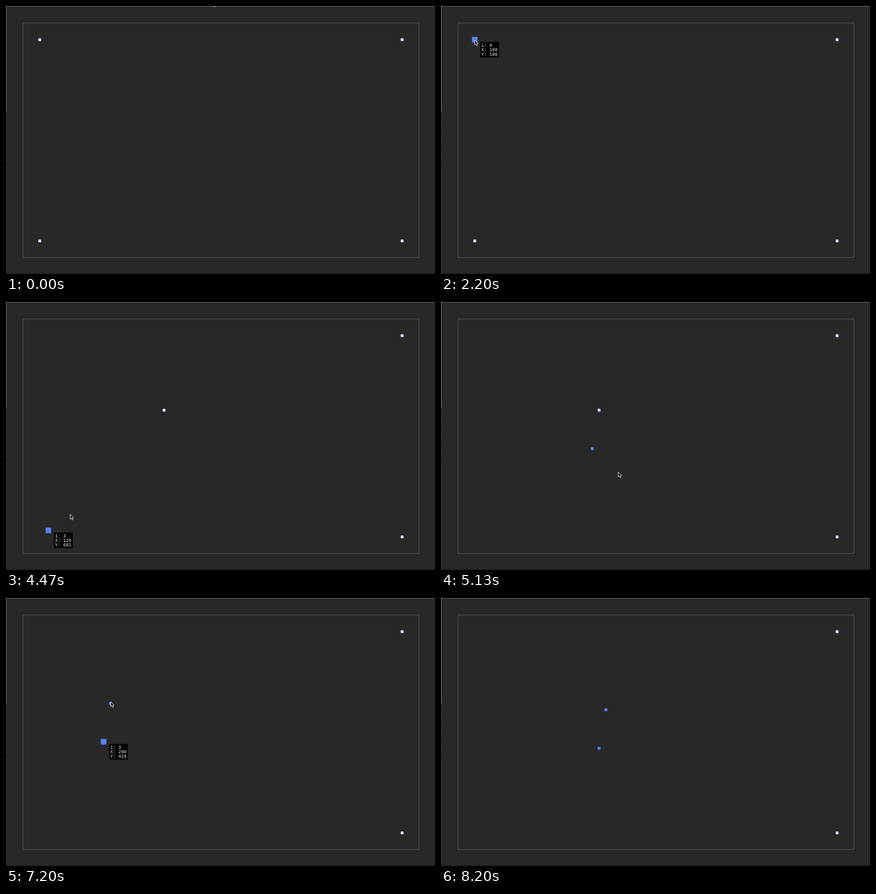
Recreate the animation shown at these times as an HTML page. Size 947 by 592 pixels, loop 9340 ms.

```html
<!DOCTYPE html>
<html lang="en">
<head>
<meta charset="utf-8">
<title>Draggable points</title>
<style>
  html, body { margin: 0; width: 100%; height: 100%; overflow: hidden; background: #282828; }
  svg { display: block; width: 100%; height: 100%; }
  text { font: 10px "Liberation Mono", "DejaVu Sans Mono", monospace; fill: #eee; white-space: pre; }
</style>
</head>
<body>
<svg viewBox="0 0 947 592">
  <rect width="947" height="592" fill="#282828"/>
  <g id="edges">
    <rect width="947" height="1" fill="#808080"/>
    <rect y="590" width="947" height="2" fill="#241e21"/>
    <rect width="1" height="235" fill="#8c8c8c"/>
    <rect y="235" width="1" height="357" fill="#292b3c"/>
  </g>
  <rect x="37.5" y="37.5" width="874" height="518" fill="none" stroke="#5e5e5e"/>
  <g id="points" stroke="#5881ee" stroke-opacity=".6" stroke-width=".74"></g>
  <rect id="marquee" fill="none" stroke="#5e5e5e"/>
  <g id="tip">
    <rect width="41.5" height="34.5" fill="#000"/>
    <text x="2.5" y="10.5"></text>
    <text x="2.5" y="20.5"></text>
    <text x="2.5" y="30.5"></text>
  </g>
  <path id="cursor" d="M0 .5V11.4L2.5 9.2L4.4 13.3L6.3 12.4L4.5 8.4H7.7Z" fill="#202020" stroke="#eee"/>
</svg>
<script>
const LOOP = 9340, STEP = 1000 / 15;
const SCALE = 0.7407, SHIFT = 0.4;
const WHITE = '#fff', BLUE = '#5881ee';
const $ = id => document.getElementById(id);

const toScreen = units => units * SCALE + SHIFT;
const toUnits = px => Math.round((px - SHIFT) / SCALE);
const between = (s, from, to) => s >= from && s < to;
const smooth = u => u * u * (3 - 2 * u);
const mix = (a, b, u) => a.map((v, i) => v + (b[i] - v) * u);

const corners = [[100, 100], [1180, 100], [1180, 700], [100, 700]].map(p => p.map(toScreen));
const upperDrop = [349, 239], lowerDrop = [334, 324];
const boxStart = [427, 404], boxEnd = [282, 175];

// Fast sweep of the grabbed pair, u from 0 to 1.
function orbit(u) {
  const a = (158 + 281 * u) * Math.PI / 180;
  return [361 + 157 * Math.cos(a), 282 + 95 * Math.sin(a)];
}

// Cursor moves: first step, last step, destination
const moves = [
  [4, 8, [82, 86]],
  [18, 22, corners[0]],
  [34, 40, upperDrop],
  [43, 51, [91, 501]],
  [51, 53, corners[3]],
  [65, 71, lowerDrop],
  [74, 77, [391, 375]],
  [79, 82, boxStart],
  [82, 88, boxEnd],
  [88, 100, [338, 322]],
  [102, 107, orbit(0)],
  [107, 112, orbit],
  [112, 113, [320, 364]],
  [113, 121, [349, 332]]
];

function cursorAt(s) {
  let at = [455, -11];
  for (const [start, end, goal] of moves) {
    if (s <= start) break;
    const u = Math.min(1, (s - start) / (end - start));
    at = typeof goal === 'function' ? goal(u) : mix(at, goal, smooth(u));
  }
  return at;
}

// A dragged point trails the cursor by one step.
function dragged(s, start, end, home) {
  return s <= start ? home : cursorAt(Math.min(s, end) - 1);
}

function layout(s) {
  const points = corners.slice();
  points[0] = dragged(s, 34, 41, corners[0]);
  points[3] = dragged(s, 65, 72, corners[3]);
  if (s > 102) {
    points[3] = cursorAt(s - 1);
    points[0] = points[3].map((v, i) => v + upperDrop[i] - lowerDrop[i]);
  }
  return points;
}

function set(el, attrs) {
  for (const name in attrs) el.setAttribute(name, attrs[name]);
}

function addRect(parent, attrs = {}) {
  const el = document.createElementNS('http://www.w3.org/2000/svg', 'rect');
  set(el, attrs);
  parent.append(el);
  return el;
}

const squares = corners.map(() => addRect($('points')));
const lines = $('tip').querySelectorAll('text');

for (let y = 240; y < 380; y += 20) {
  addRect($('edges'), { y, width: 1, height: 3, fill: '#77777c' });
}

function render(s) {
  const points = layout(s);
  const hovered = between(s, 21, 44) ? 0
    : between(s, 53, 75) || between(s, 102, 123) ? 3 : -1;
  const selected = [between(s, 28, 59) || s >= 88, false, false, s >= 59];

  points.forEach(([x, y], i) => {
    const size = (i === hovered ? 16 : 8) * SCALE;
    set(squares[i], {
      x: x - size / 2, y: y - size / 2, width: size, height: size,
      fill: selected[i] ? BLUE : WHITE
    });
  });

  $('tip').style.display = hovered < 0 ? 'none' : '';
  if (hovered >= 0) {
    const [x, y] = points[hovered];
    set($('tip'), { transform: `translate(${x + 12} ${y + 4.8})` });
    lines[0].textContent = `i: ${hovered}`;
    lines[1].textContent = `X: ${toUnits(x)}`;
    lines[2].textContent = `Y: ${toUnits(y)}`;
  }

  const [cx, cy] = cursorAt(s), [bx, by] = boxStart;
  $('marquee').style.display = between(s, 83, 89) ? '' : 'none';
  set($('marquee'), {
    x: Math.min(cx, bx), y: Math.min(cy, by),
    width: Math.abs(bx - cx), height: Math.abs(by - cy)
  });
  $('cursor').style.display = s < 123 ? '' : 'none';
  set($('cursor'), { transform: `translate(${cx} ${cy})` });
}

const startTime = performance.now();
function tick() {
  const t = (performance.now() - startTime) % LOOP;
  render(Math.floor((t + 4) / STEP));
  requestAnimationFrame(tick);
}
tick();
</script>
</body>
</html>
```
